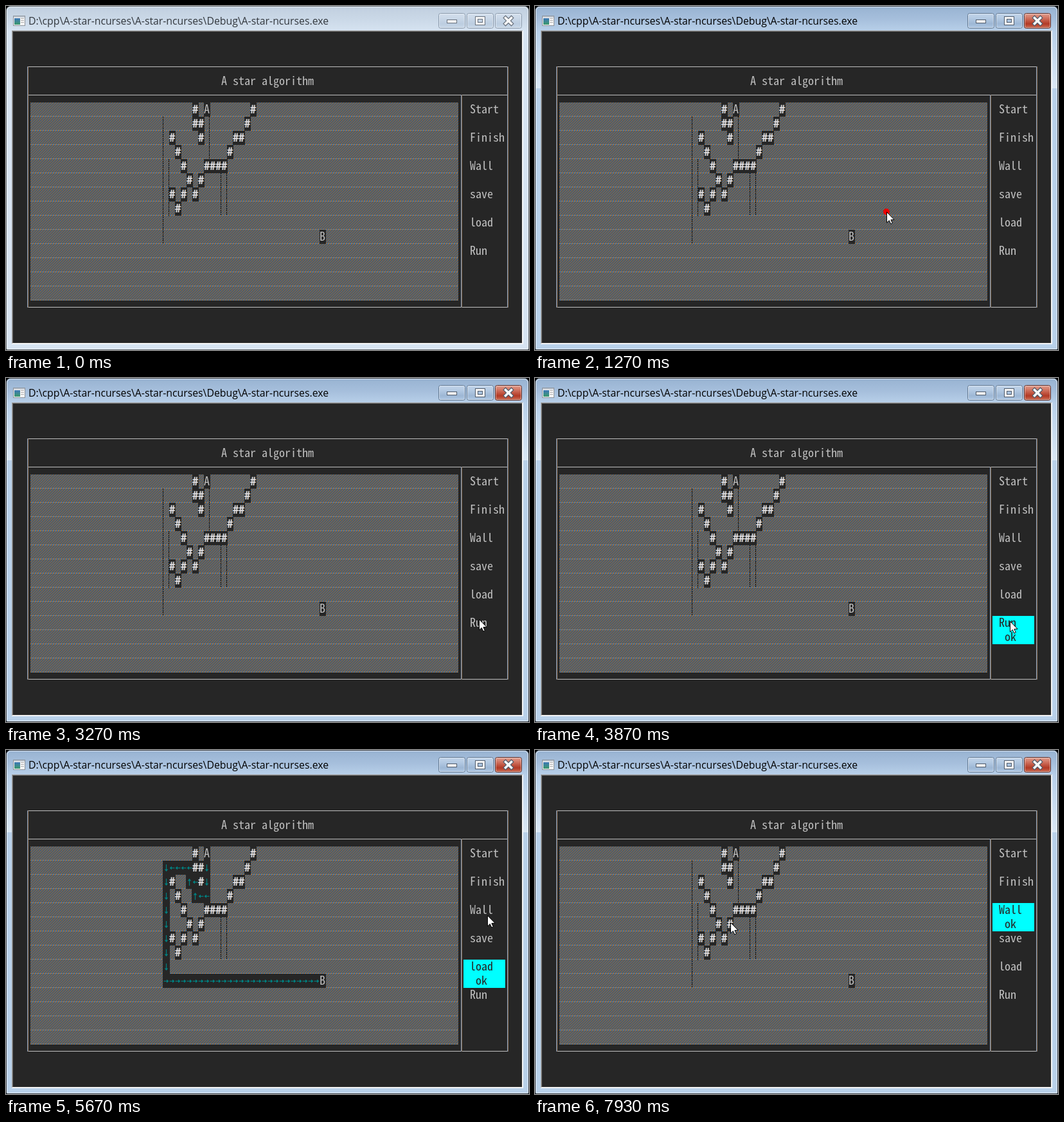
Write an HTML page with a canvas that moves like this. It is 814 px wide and 535 px high and loops after 8000 ms.

```html
<!DOCTYPE html>
<html lang="en">
<head>
<meta charset="utf-8">
<title>A star algorithm</title>
<style>
html, body { margin: 0; width: 100%; height: 100%; overflow: hidden; }
canvas { display: block; }
</style>
</head>
<body>
<canvas id="stage" width="814" height="535"></canvas>
<script>
const ctx = document.getElementById('stage').getContext('2d');

// Time runs in ticks of 1/15 s.
const LOOP = 8000, TICK = 1000 / 15;
const CELL_W = 9, CELL_H = 22, LEFT = 38, TOP = 150, COLS = 74, ROWS = 14;
const BG = '#262626', FG = '#c0c0c0', CYAN = '#00ffff', TEAL = '#008080';
const BLUE = '#5080ac', ORANGE = '#a87c50';
const MONO = '18px "Noto Sans Mono CJK SC", "Noto Sans Mono CJK JP", "Noto Sans CJK SC", monospace';
const SANS = '15.8px "Open Sans", "Noto Sans", sans-serif';

const MAP_COL = 24;
const MAP = [
  '    # A       #',
  '    ##       #',
  '#    #     ##',
  ' #        #',
  '  #   ####',
  '   # #',
  '# # #',
  ' #',
  '',
  ' '.repeat(26) + 'B'
];
// Steps of the route, from the cell below A to B.
const ROUTE = 'd2 l2 u1 l1 u1 l4 d8 r27';
const DIRS = { r: [0, 1], d: [1, 0], l: [0, -1], u: [-1, 0] };
const MENU = ['Start', 'Finish', 'Wall', 'save', 'load', 'Run'];

// Pointer moves after entering at ENTRY: start tick, end tick, x, y.
const ENTRY = [742, 503];
const MOVES = [
  [5, 8, 462, 377], [11, 17, 547, 320], [37, 41, 650, 309], [41, 50, 739, 378],
  [63, 69, 742, 344], [80, 85, 749, 257], [91, 99, 343, 245],
  [101, 105, 334, 249], [110, 114, 305, 257], [117, 119, 304, 268]
];
const CLICKS = [18, 51, 74, 86], RIPPLE = 7;
const PRESSES = [
  { item: 'Run', from: 52, to: 64 },
  { item: 'load', from: 75, to: 88 },
  { item: 'Wall', from: 89, to: 120 }
];
const ACTIVE_FROM = 18, ROUTE_FROM = 64, ROUTE_TO = 88;

const colX = c => LEFT + c * CELL_W;
const rowY = r => TOP + r * CELL_H;

function box(x, y, w, h, color) {
  ctx.fillStyle = color;
  ctx.fillRect(x, y, w, h);
}

// Rectangle edge, one colour for top and left, one for bottom and right.
function bevel(x, y, w, h, light, dark) {
  box(x, y, w, h, dark);
  box(x, y, w - 1, h - 1, light);
  box(x + 1, y + 1, w - 2, h - 2, BG);
}

function text(str, x, y, color, font = MONO) {
  ctx.font = font;
  ctx.fillStyle = color;
  ctx.fillText(str, x, y);
}

function rounded(x, y, w, h, r, fill, stroke) {
  ctx.beginPath();
  ctx.roundRect(x, y, w, h, r);
  ctx.lineWidth = 1;
  if (fill) { ctx.fillStyle = fill; ctx.fill(); }
  if (stroke) { ctx.strokeStyle = stroke; ctx.stroke(); }
}

function gradient(y0, y1, ...colors) {
  const g = ctx.createLinearGradient(0, y0, 0, y1);
  colors.forEach((c, i) => g.addColorStop(i / (colors.length - 1), c));
  return g;
}

function polygon(points, fill, stroke) {
  ctx.beginPath();
  points.forEach(([x, y]) => ctx.lineTo(x, y));
  ctx.closePath();
  ctx.fillStyle = fill;
  ctx.fill();
  if (!stroke) return;
  ctx.strokeStyle = stroke;
  ctx.lineWidth = 1;
  ctx.stroke();
}

// Diagonal stripes with a brighter bottom line in each text row.
function makeHatch() {
  const tile = document.createElement('canvas');
  tile.width = 4;
  tile.height = CELL_H;
  const c = tile.getContext('2d');
  const stripes = [ORANGE, '#3c3c3c', BLUE, '#4c4c4c'];
  for (let y = 0; y < CELL_H; y++) {
    for (let x = 0; x < 4; x++) {
      const n = (x + y) % 4;
      c.fillStyle = y === CELL_H - 1 ? stripes[n & 2] : stripes[n];
      c.fillRect(x, y, 1, 1);
    }
  }
  return ctx.createPattern(tile, 'repeat');
}
const hatch = makeHatch();

function drawButton(x, active, red) {
  const fill = !active ? gradient(11, 36, '#d5e1ee', '#c9d7e7', '#bccde0', '#cbdaea')
    : red ? gradient(11, 36, '#e3a596', '#cf6f5c', '#b23a26', '#d0765c')
    : gradient(11, 36, '#c4d6ea', '#b3c9e2', '#9db7d5', '#b4cde8');
  rounded(x + .5, 11.5, 41, 23, 3, fill, !active ? '#8898ab' : red ? '#5b2720' : '#5f7690');
  rounded(x + 1.5, 12.5, 39, 21, 2, null, 'rgba(255,255,255,.45)');
}

function drawCross(x, y, arm, width, color) {
  ctx.beginPath();
  for (const s of [-1, 1]) {
    ctx.moveTo(x - arm, y - arm * s);
    ctx.lineTo(x + arm, y + arm * s);
  }
  ctx.strokeStyle = color;
  ctx.lineWidth = width;
  ctx.stroke();
}

function drawButtons(active) {
  const line = active ? '#4f5b6b' : '#68717d', white = '#f8f8f8';
  for (let i = 0; i < 3; i++) drawButton(673 + i * 44, active, i === 2);
  box(686, 21, 16, 6, line);
  box(687, 22, 14, 4, white);
  box(730, 16, 16, 14, line);
  box(731, 17, 14, 12, white);
  box(734, 20, 8, 6, line);
  box(735, 21, 6, 4, active ? '#a9c2de' : '#c4d3e4');
  drawCross(782, 23, 6.6, 6, line);
  drawCross(782, 23, 5.8, 3.6, white);
}

function drawIcon() {
  box(11, 15, 19, 16, '#8d949c');
  box(12, 16, 17, 14, '#f4f4f4');
  box(12, 16, 17, 2, '#c4ccd6');
  box(13, 19, 9, 10, gradient(19, 29, '#3f78b8', '#3c9a6c'));
  for (let y = 19; y < 28; y += 3) box(23, y, 5, 1, '#b0b0b0');
}

function drawWindow(active) {
  const side = active ? '#b9d1ea' : '#d7e4f2';
  box(0, 0, 814, 535, '#000');
  rounded(0, 0, 814, 535, [7, 7, 2, 2], active ? '#2f3a46' : '#5c6670');
  rounded(1, 1, 812, 533, [6, 6, 1, 1], side);
  rounded(1, 1, 812, 39, [6, 6, 0, 0], active ? gradient(1, 40, '#98b3d2', '#a6bfdc', side)
    : gradient(1, 40, '#c1cfdf', '#cad8e7', side));
  if (active) box(1, 40, 812, 88, gradient(40, 128, side, '#dbe8f5'));
  rounded(1.5, 1.5, 811, 532, [6, 6, 1, 1], null, 'rgba(255,255,255,.7)');
  drawIcon();
  text('D:\\cpp\\A-star-ncurses\\A-star-ncurses\\Debug\\A-star-ncurses.exe', 35, 29,
    active ? '#000' : '#33383e', SANS);
  drawButtons(active);
  bevel(9, 38, 796, 488, '#a0a0a0', '#ffffff');
  bevel(10, 39, 794, 486, '#696969', '#e3e3e3');
}

function drawLayout() {
  for (const y of [94, 138, 468]) box(33, y, 748, 1, FG);
  for (const [x, y] of [[33, 94], [708, 138], [780, 94]]) {
    box(x, y, 1, 469 - y, '#7f98b8');
    box(x + 1, y, 1, 469 - y, '#94785c');
  }
  text('A star algorithm', 335, 123, FG);
}

function drawMenu(tick) {
  const press = PRESSES.find(p => tick >= p.from && tick < p.to);
  MENU.forEach((label, i) => {
    const y = rowY(i * 2), on = press && press.item === label;
    if (on) {
      box(712, y, 65, 44, CYAN);
      text('ok', 731, y + 39, BG);
    }
    text(label, 722, y + 17, on ? BG : FG);
  });
}

function drawCell(row, col, char) {
  const x = colX(col), y = rowY(row) + 17;
  box(x, rowY(row), CELL_W + 1, CELL_H, BG);
  if (char !== '#') return text(char, x, y, FG);
  // Walls are bold with blue and orange fringes.
  ctx.globalCompositeOperation = 'screen';
  text(char, x - .3, y, '#7398bc', 'bold ' + MONO);
  text(char, x + .5, y, '#bc9c73', 'bold ' + MONO);
  ctx.globalCompositeOperation = 'source-over';
}

function drawArrow(row, col, dir) {
  const [dy, dx] = DIRS[dir], half = dy ? 5.5 : 4;
  box(colX(col) - 1, rowY(row), CELL_W + 2, CELL_H, BG);
  ctx.save();
  ctx.translate(colX(col) + 4.5, rowY(row) + 11.5);
  ctx.rotate(Math.atan2(dy, dx));
  box(-half, -.6, half * 2 - 1, 1.2, TEAL);
  polygon([[half, 0], [half - 3.5, -2.8], [half - 3.5, 2.8]], TEAL);
  ctx.restore();
}

function drawRoute() {
  let row = 1, col = 30;
  for (const [dir, ...count] of ROUTE.split(' ')) {
    for (let n = +count.join(''); n > 0; n--) {
      drawArrow(row, col, dir);
      row += DIRS[dir][0];
      col += DIRS[dir][1];
    }
  }
}

// Dotted leftover at the left edge of a column.
function drawSeam(col, first, last) {
  for (let y = rowY(first); y < rowY(last + 1); y += 3) box(colX(col) - 1, y, 1, 2, '#080808');
}

function drawMap(tick) {
  ctx.save();
  ctx.translate(LEFT, TOP);
  box(0, 0, COLS * CELL_W, ROWS * CELL_H, hatch);
  ctx.restore();
  drawSeam(23, 1, 9);
  drawSeam(24, 4, 7);
  drawSeam(31, 1, 3);
  drawSeam(33, 5, 7);
  drawSeam(34, 5, 7);
  if (tick >= ROUTE_FROM && tick < ROUTE_TO) drawRoute();
  MAP.forEach((line, row) => [...line].forEach((char, i) => {
    if (char !== ' ') drawCell(row, MAP_COL + i, char);
  }));
}

function pointerAt(tick) {
  let [x, y] = ENTRY;
  for (const [from, to, toX, toY] of MOVES) {
    if (tick < from) break;
    const p = Math.min(1, (tick - from) / (to - from));
    const eased = 1 - (1 - p) ** 1.5;
    x += (toX - x) * eased;
    y += (toY - y) * eased;
  }
  return [Math.round(x), Math.round(y)];
}

function drawPointer(tick) {
  if (tick < MOVES[0][0]) return;
  const [x, y] = pointerAt(tick);
  const click = CLICKS.find(t => tick >= t && tick < t + RIPPLE);
  if (click) {
    const age = tick - click;
    ctx.beginPath();
    ctx.arc(x, y, Math.max(1, age * 4 - 1.5), 0, Math.PI * 2);
    ctx.strokeStyle = `rgba(235,0,0,${1.1 - age * .1})`;
    ctx.lineWidth = 5;
    ctx.stroke();
  }
  const shape = [[0, 0], [0, 16.5], [3.8, 13], [6.3, 18.5], [8.8, 17.4], [6.4, 12], [11.5, 11.8]];
  polygon(shape.map(([dx, dy]) => [x + dx + .5, y + dy + .5]), '#fff', '#000');
}

function draw() {
  const time = performance.now() % LOOP;
  const tick = Math.floor((time + 5) / TICK) % 120;
  drawWindow(tick >= ACTIVE_FROM);
  drawLayout();
  drawMap(tick);
  drawMenu(tick);
  drawPointer(tick);
  requestAnimationFrame(draw);
}
draw();
</script>
</body>
</html>
```
